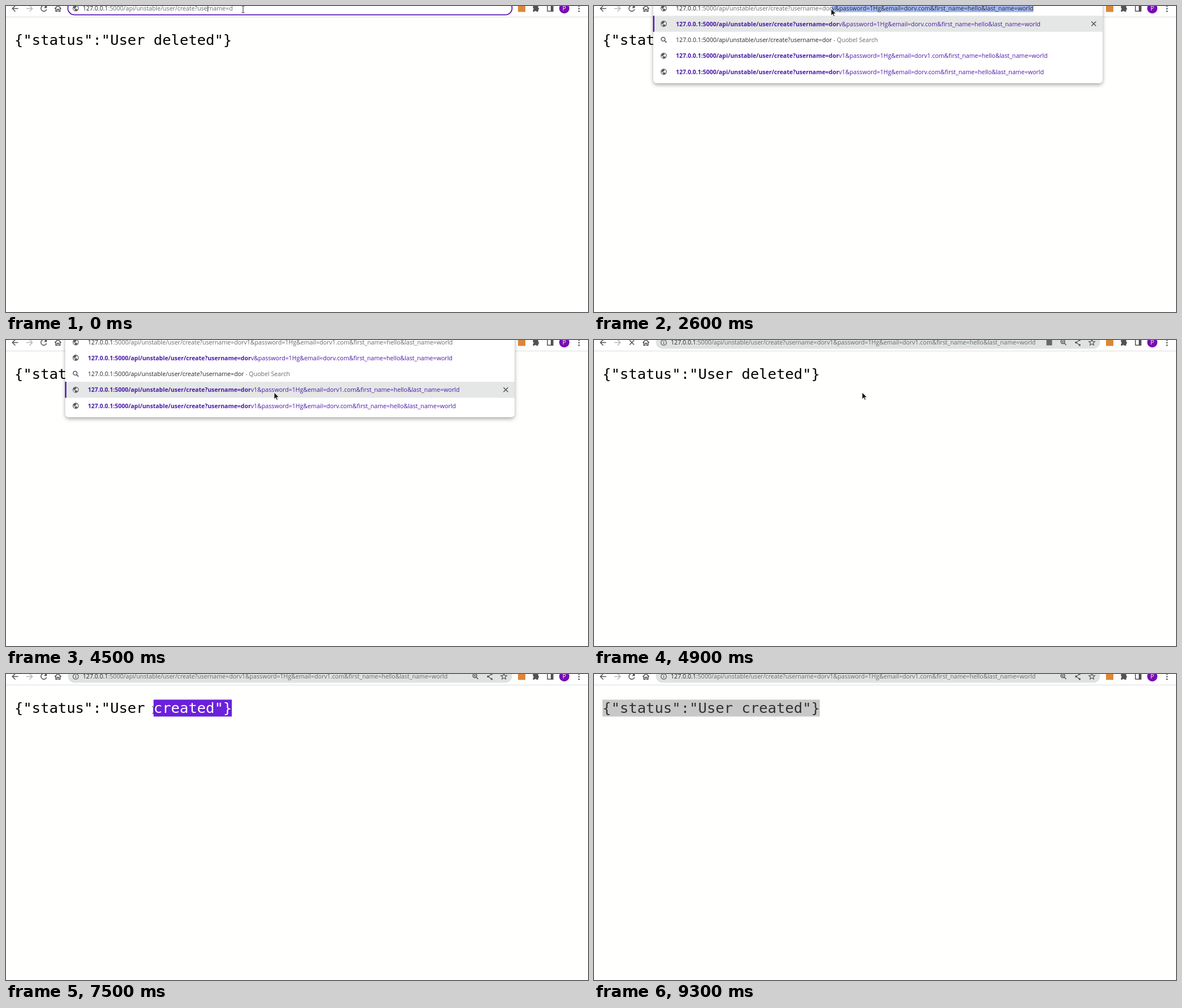
An HTML page that plays this animation: 1031 by 543 pixels, repeating every 9400 ms.

```html
<!DOCTYPE html>
<html lang="en">
<head>
<meta charset="utf-8">
<title>User create request</title>
<style>
html, body { margin: 0; width: 100%; height: 100%; overflow: hidden; background: #fffffd; }
svg { display: block; width: 1031px; height: 543px; }
.ui { font: 10.64px "Open Sans", "Noto Sans", sans-serif; fill: #66696c; }
.ui b, .bold { font-weight: 700; font-size: 10.48px; }
.host { fill: #25272a; }
.link { fill: #4a1aa8; }
.mono { font: 25.6px "DejaVu Sans Mono", monospace; }
.line { fill: none; stroke: #505356; stroke-width: 1.5; }
</style>
</head>
<body>
<svg viewBox="0 0 1031 543">
  <defs>
    <filter id="shade" x="-5%" y="-20%" width="110%" height="150%">
      <feDropShadow dx="0" dy="3" stdDeviation="3.5" flood-color="#000" flood-opacity=".34"/>
    </filter>
    <g id="globe">
      <circle r="5.4" fill="#5b5e61"/>
      <path d="M-4.3-.9L-1.4 1.8V4.3C-3.3 3.7-4.6 1.7-4.3-.9ZM.9-4.3C3.4-3.4 4.7-1 4.2 1.3L2.7 2.8 1.8 1H-1.2V-.5H.3V-2H1.5Z" fill="#f2f3f2"/>
    </g>
    <g id="lens" class="line"><circle cx="-1" cy="-1" r="3.4"/><path d="M1.5 1.5L5 5"/></g>
    <path id="cross" class="line" d="M-4-4L4 4M4-4L-4 4"/>
    <path id="arrow" d="M0 0V12L2.8 9.4 4.6 13.4 6.5 12.6 4.8 8.7H8.6Z" fill="#161616" stroke="#fff" stroke-width=".8"/>
    <path id="beam" d="M-2.5-6H-.6L0-5.4 .6-6H2.5M0-5.4V5.4M-2.5 6H-.6L0 5.4 .6 6H2.5" fill="none" stroke="#222"/>
  </defs>
  <rect width="1031" height="543" fill="#fffffd"/>
  <g id="page"></g>
  <rect width="1031" height="19" fill="#fff"/>
  <rect y="19" width="1031" height="1" fill="#dcdedd"/>
  <g class="line">
    <path d="M21.5 4.5H11.5M16.5-.7L11.3 4.5 16.5 9.7"/>
    <path d="M36 4.5H46.5M41.5-.7L46.7 4.5 41.5 9.7" stroke="#b5b7b8"/>
    <path d="M86.3 4.8L92-.7 97.7 4.8M88.2 3.5V9.6H90.6V5.8H93.4V9.6H95.8V3.5"/>
    <rect x="959.2" y="-.8" width="9.8" height="10"/>
  </g>
  <rect x="907" y="-2" width="13" height="12.5" fill="#d9873b"/>
  <path d="M933.5 0H936.4A1.9 1.9 0 0 1 940 0H942.8V3.1A1.9 1.9 0 0 1 942.8 6.8V10H939.6A1.9 1.9 0 0 0 936.1 10H933.5V6.9A1.9 1.9 0 0 0 933.5 3.4Z" fill="#505356"/>
  <rect x="965" y="-1" width="4" height="10.5" fill="#505356"/>
  <circle cx="989" cy="4.2" r="9" fill="#750fb0"/>
  <text class="ui" x="989" y="8" text-anchor="middle" style="fill:#fff">P</text>
  <g fill="#505356"><circle cx="1015" cy=".3" r="1.35"/><circle cx="1015" cy="4.8" r="1.35"/><circle cx="1015" cy="9.3" r="1.35"/></g>
  <g id="bar"></g>
  <g id="mouse"></g>
</svg>
<script>
const LOOP = 9400;
const HOST = '127.0.0.1', PATH = ':5000/api/unstable/user/create?username=';
const NAME = 'dorv';
const tail = mail => `&password=1Hg&email=${mail}.com&first_name=hello&last_name=world`;
const FULL = NAME + 1 + tail(NAME + 1);
const entries = [NAME + tail(NAME), null, FULL, NAME + 1 + tail(NAME)];

// Each step changes part of the state from its time on.
const steps = [
  [0, { mode: 'edit', typed: 1, matched: 1, caret: 357.5, done: 0, word: 'deleted', loading: 0,
        active: -1, hover: -1, picked: 0, sel: 0, focus: 1, cursor: ['beam', 420, 6] }],
  [200, { caret: 0 }],
  [600, { caret: 401.7 }],
  [1100, { caret: 0 }],
  [1600, { caret: 401.7 }],
  [1800, { mode: 'list', typed: 2, caret: 415, cursor: null }],
  [1900, { done: 1, caret: 0 }],
  [2400, { active: 0, matched: 2 }],
  [2600, { typed: 3, matched: 3, cursor: ['arrow', 420, 5] }],
  [3400, { cursor: ['arrow', 432, 27], hover: 0 }],
  [3500, { cursor: ['arrow', 451, 56], hover: 1 }],
  [3600, { cursor: ['arrow', 468, 82], hover: 2 }],
  [3700, { cursor: ['arrow', 475, 93] }],
  [4500, { active: 2, picked: 1 }],
  [4900, { mode: 'view', loading: 1 }],
  [5900, { loading: 0, word: 'created' }],
  [6700, { cursor: ['arrow', 433, 70] }],
  [6800, { cursor: ['arrow', 429, 68] }],
  ...[1, 4, 9, 14, 19, 23, 25].map((n, i) =>
    [7300 + i * 100, { sel: n, cursor: n < 25 ? ['beam', 400 - n * 15.4, 64] : null }]),
  [8500, { cursor: ['arrow', 15, 29] }],
  [8600, { cursor: ['arrow', 8, 6] }],
  [8700, { cursor: null }],
  [9300, { focus: 0 }]
];

const $ = id => document.getElementById(id);
const esc = s => s.replace(/&/g, '&amp;');
const use = (id, x, y) => `<use href="#${id}" x="${x}" y="${y}"/>`;
const box = (x, y, w, h, fill) => `<rect x="${x}" y="${y}" width="${w}" height="${h}" fill="${fill}"/>`;
const caretAt = x => x ? box(x - .5, 0, 1, 10, '#333') : '';
const url = (x, rest, marked = '') => `<text class="ui" x="${x}" y="8"><tspan class="host">${HOST}</tspan>` +
  `${PATH}${esc(rest)}<tspan class="host">${esc(marked)}</tspan></text>`;

function page(s) {
  const line = `{"status":"User ${s.word}"}`;
  const text = fill => `<text class="mono" x="15" y="69" fill="${fill}">${line}</text>`;
  const w = s.sel * 15.4, x = 400 - w;
  if (!s.sel) return text('#000');
  return text('#000') + `<clipPath id="cut">${box(x, 45.5, w, 30, '#000')}</clipPath>` +
    box(x, 45.5, w, 30, s.focus ? '#6b20dc' : '#c8c8c8') +
    `<g clip-path="url(#cut)">${text(s.focus ? '#fff' : '#323232')}</g>`;
}

const reload = s => s.loading ? use('cross', 67, 4.5) :
  '<path class="line" d="M70.6 .9A5 5 0 1 0 71.8 5.7"/><path d="M72.4-1.8V3.4H67.2Z" fill="#505356"/>';

function edit(s) {
  return '<rect x="109.5" y="-8" width="787" height="23.6" rx="11.8" fill="#fff" stroke="#5518b5" stroke-width="1.8"/>' +
    use('globe', 123.5, 4) + url(136, NAME.slice(0, s.typed)) + caretAt(s.caret);
}

function view(s) {
  return '<rect x="109.5" y="-8" width="787" height="23.5" rx="11.75" fill="#dfe2e0"/>' +
    '<g class="line" stroke-width="1.2"><circle cx="123.5" cy="4.5" r="4.8" style="stroke-width:1.1"/>' +
    '<path d="M123.5 3.8V7.2M123.5 1.6V2.8" style="stroke-width:1.2"/></g>' +
    url(136, FULL) + (s.loading ? box(801.5, -.5, 10, 10, '#66696c') : '') +
    use('lens', 831.5, 4) + '<path class="line" d="M828.6 3H832.4M830.5 1.1V4.9" style="stroke-width:1"/>' +
    '<path class="line" d="M860.5 0L853.8 4.5 860.5 9" style="stroke-width:1.1"/>' +
    [[860.3, 0], [853.8, 4.5], [860.3, 9]].map(([x, y]) => `<circle cx="${x}" cy="${y}" r="1.7" fill="#505356"/>`).join('') +
    '<path class="line" d="M882-.9L883.5 2.6 887.3 2.9 884.4 5.4 885.3 9.1 882 7.1 878.7 9.1 879.6 5.4 876.7 2.9 880.5 2.6Z" style="stroke-width:1.2"/>';
}

function row(s, i) {
  const mid = 31.5 + i * 28.4, base = mid + 4, top = mid - 14.2;
  const on = i === s.active || i === s.hover;
  const typed = NAME.slice(0, s.matched);
  let out = on ? box(105, top, 796, 28.4, '#e4e7e5') : '';
  if (i === s.active) out += box(104.5, top, 2.5, 28.4, '#5518b5');
  if (on && entries[i]) out += use('cross', 885.3, mid);
  if (!entries[i]) {
    return out + use('lens', 123.5, mid) + `<text class="ui" x="145" y="${base}"><tspan class="host">` +
      `${HOST + PATH + typed}</tspan> - Quobel Search</text>`;
  }
  return out + use('globe', 123.5, mid) + `<text class="ui" x="145" y="${base}"><tspan class="link bold">` +
    `${HOST + PATH + typed}</tspan><tspan class="link">${esc(entries[i].slice(s.matched))}</tspan></text>`;
}

function list(s) {
  const first = entries[0], start = s.typed < 3 ? 414.6 : 421;
  let out = '<rect x="105" y="-20" width="796" height="157" rx="7" fill="#fff" filter="url(#shade)"/>' +
    use('globe', 123.5, 4);
  if (s.picked) out += url(145, FULL);
  else if (s.done) out += box(start, -2, 778.5 - start, 13, '#a5b9f3') + url(145, first.slice(0, s.typed), first.slice(s.typed));
  else out += url(145, NAME.slice(0, s.typed)) + caretAt(s.caret);
  return out + entries.map((_, i) => row(s, i)).join('');
}

const bars = { edit, view, list };
let shown = -1;

function frame() {
  const t = performance.now() % LOOP;
  const n = steps.filter(([at]) => at <= t).length;
  if (n !== shown) {
    shown = n;
    const s = Object.assign({}, ...steps.slice(0, n).map(p => p[1]));
    $('page').innerHTML = page(s);
    $('bar').innerHTML = reload(s) + bars[s.mode](s);
    $('mouse').innerHTML = s.cursor ? use(...s.cursor) : '';
  }
  requestAnimationFrame(frame);
}
frame();
</script>
</body>
</html>
```
